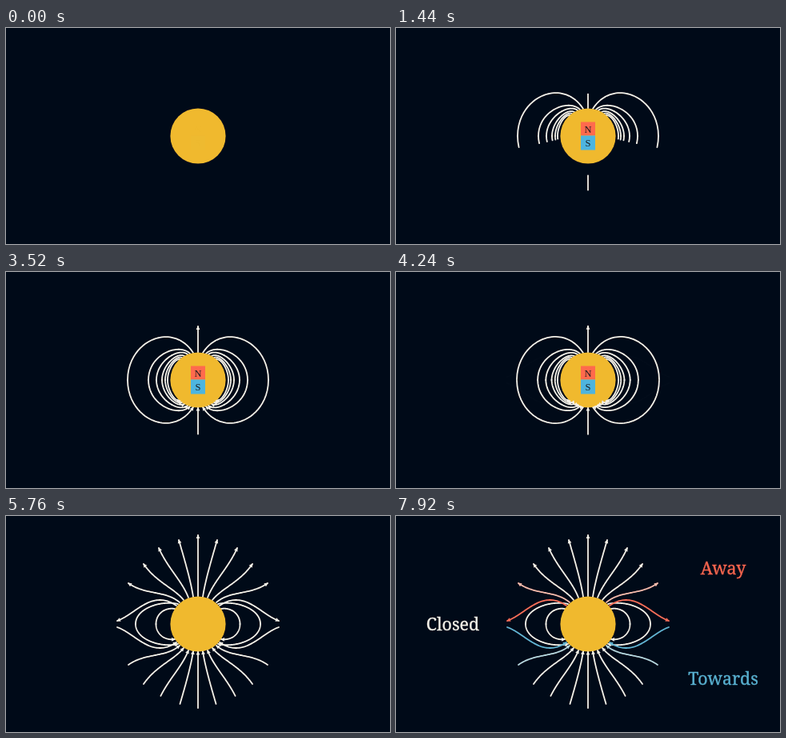
An HTML page with a canvas for the animation above (8000 ms loop, 480 by 270 pixels).

```html
<!DOCTYPE html>
<html lang="en">
<head>
<meta charset="utf-8">
<title>Magnetic field of a star</title>
<style>
html, body { margin: 0; width: 100%; height: 100%; overflow: hidden; background: #000a18; }
canvas { display: block; width: 480px; height: 270px; }
</style>
</head>
<body>
<canvas id="stage" width="480" height="270"></canvas>
<script>
const ctx = document.getElementById('stage').getContext('2d');
const LOOP = 8000, STEP = 80, CX = 240, CY = 135, R = 34.6, SAMPLES = 72, LAG = 3.5;
const WHITE = [245, 241, 232], RED = [250, 101, 78], BLUE = [88, 176, 208];

const clamp = x => Math.max(0, Math.min(1, x));
const mix = (a, b, t) => a + (b - a) * t;
const sigmoid = x => 1 / (1 + Math.exp(-x));
const EDGE = sigmoid(-5);
const smooth = x => clamp((sigmoid(10 * (clamp(x) - 0.5)) - EDGE) / (1 - 2 * EDGE));
const ramp = (t, start, length = 1000) => smooth((t - start) / length);
const rgb = c => `rgb(${c.map(Math.round).join(',')})`;
const blend = (a, b, t) => a.map((v, i) => mix(v, b[i], t));

function bezier(c, t) {
  const u = 1 - t, w = [u * u * u, 3 * u * u * t, 3 * u * t * t, t * t * t];
  return [0, 1].map(k => w.reduce((sum, v, i) => sum + v * c[2 * i + k], 0));
}

// Upper right quarter of each field line, from the surface outwards.
// a: dipole shape, b: stretched shape, order: place in the colour wave.
const OPEN = [
  { a: [6, -34, 32, -74, 88, -49, 88, 0], b: [6, -34, 9, -54, 17, -81, 24, -105], trim: 0.93, order: 4 },
  { a: [10, -33, 24, -47, 62, -32, 62, 0], b: [12, -33, 20, -54, 38, -70, 49, -95], trim: 0.93, order: 3 },
  { a: [13, -32, 24, -41, 52, -24, 52, 0], b: [18, -30, 30, -45, 52, -52, 68, -75], trim: 1, order: 2 },
  { a: [17, -30, 27, -35, 45, -18, 45, 0], b: [23, -27, 40, -42, 66, -36, 87, -51], trim: 1, order: 1 }
];
const CLOSED = [
  { a: [20, -28, 28, -31, 41, -15, 41, 0], b: [25, -25, 45, -30, 78, -20, 78, 0] },
  { a: [22, -26, 30, -27, 38, -12, 38, 0], b: [29, -19, 41, -21, 52.5, -13, 52.5, 0] }
];
const EQUATOR = [27, -23, 58, -44, 78, -12, 101, -4];

// Half-turn path between two points.
function swing(A, B, p) {
  const x = (A[0] - B[0]) / 2, y = (A[1] - B[1]) / 2;
  const c = Math.cos(Math.PI * p), s = Math.sin(Math.PI * p);
  return [(A[0] + B[0]) / 2 + x * c + y * s, (A[1] + B[1]) / 2 + y * c - x * s];
}

function quarter(at, sx, sy) {
  const pts = [];
  for (let i = 0; i <= SAMPLES; i++) {
    const q = at(i / SAMPLES);
    pts.push([CX + sx * q[0], CY + sy * q[1]]);
  }
  return pts;
}

function stroke(pts, from, to, color, alpha = 1) {
  if (to <= from || alpha <= 0) return;
  const n = pts.length - 1;
  const at = u => {
    const i = Math.min(n - 1, Math.floor(u * n)), f = u * n - i;
    return [mix(pts[i][0], pts[i + 1][0], f), mix(pts[i][1], pts[i + 1][1], f)];
  };
  ctx.globalAlpha = alpha;
  ctx.strokeStyle = rgb(color);
  ctx.beginPath();
  ctx.moveTo(...at(from));
  for (let i = 1; i < n; i++) if (i / n > from && i / n < to) ctx.lineTo(...pts[i]);
  ctx.lineTo(...at(to));
  ctx.stroke();
  ctx.globalAlpha = 1;
}

function drawTip({ pts, outer, color, alpha }) {
  if (alpha <= 0) return;
  const n = pts.length - 1;
  const [end, prev] = outer ? [pts[n], pts[n - 4]] : [pts[0], pts[4]];
  const turn = Math.atan2(end[1] - prev[1], end[0] - prev[0]);
  ctx.save();
  ctx.globalAlpha = alpha;
  ctx.translate(...end);
  ctx.rotate(turn);
  ctx.fillStyle = rgb(color);
  ctx.beginPath();
  ctx.moveTo(1, 0);
  ctx.lineTo(-4, -2.4);
  ctx.lineTo(-4, 2.4);
  ctx.fill();
  ctx.restore();
}

function drawField(t) {
  const grow = ramp(t, 920), p = ramp(t, 4175);
  const early = ramp(t, 1925, 500) * (1 - ramp(t, 4165, 500));
  const late = ramp(t, 5165, 500);
  const both = Math.max(early, late);
  const tips = [];
  ctx.lineWidth = 1.8;
  ctx.lineCap = ctx.lineJoin = 'round';

  const tint = (sy, order) =>
    blend(WHITE, sy < 0 ? BLUE : RED, ramp(t, 7165 + 300 * order));

  // The flow runs outwards above the equator and inwards below it.
  // pace: exponent by which the points crowd towards the surface.
  const line = (pts, top, reveal, color, tipAlpha, { alpha = 1, pace = 1 } = {}) => {
    if (top) stroke(pts, 0, reveal ** (1 / pace), color, alpha);
    else stroke(pts, (1 - reveal) ** (1 / pace), 1, color, alpha);
    tips.push({ pts, outer: top, color, alpha: tipAlpha });
  };

  for (const sy of [1, -1]) {
    const top = sy > 0;
    const half = top ? clamp(2 * grow) : clamp(2 * grow - 1);
    for (const sx of [1, -1]) {
      for (const { a, b, trim, order } of OPEN) {
        const cut = top ? 1 : trim;
        const at = u => swing(bezier(a, u ** LAG), bezier(b, u * cut), p);
        line(quarter(at, sx, sy), top, half, tint(sy, order), top ? late : both, { pace: LAG });
      }
      for (const { a, b } of CLOSED) {
        const c = a.map((v, i) => mix(v, b[i], p));
        line(quarter(u => bezier(c, u), sx, sy), top, half, WHITE, top ? 0 : both);
      }
      const pts = quarter(u => bezier(EQUATOR, u), sx, sy);
      line(pts, top, 1, tint(sy, 0), late, { alpha: p });
    }
    const reach = top ? mix(67, 111, p) : mix(67.5, 105, p);
    const axis = quarter(u => [0, -mix(R, reach, u)], 1, sy);
    line(axis, top, grow, tint(sy, 5), both);
  }
  return tips;
}

function drawMagnet(alpha) {
  if (alpha <= 0) return;
  ctx.globalAlpha = alpha;
  ctx.fillStyle = '#ff6a4d';
  ctx.fillRect(231, 117.5, 18, 17);
  ctx.fillStyle = '#4db5e0';
  ctx.fillRect(231, 134.5, 18, 18);
  ctx.fillStyle = '#1b1b20';
  ctx.font = '12.5px "Liberation Serif", serif';
  ctx.textAlign = 'center';
  ctx.fillText('N', CX, 130.7);
  ctx.fillText('S', CX, 148);
  ctx.globalAlpha = 1;
}

// Letters are outlined one after another, then filled.
function write(text, x, y, color, p) {
  if (p <= 0) return;
  ctx.font = '21.4px "Noto Serif", serif';
  ctx.textAlign = 'left';
  ctx.fillStyle = ctx.strokeStyle = rgb(color);
  const left = x - ctx.measureText(text).width / 2;
  const span = 1 + 0.2 * (text.length - 1);
  [...text].forEach((ch, i) => {
    const q = clamp(p * span - 0.2 * i);
    if (q <= 0) return;
    const gx = left + ctx.measureText(text.slice(0, i + 1)).width - ctx.measureText(ch).width;
    const fill = smooth(2 * q - 1);
    ctx.lineWidth = mix(1, 0.35, fill);
    ctx.setLineDash(q < 0.5 ? [70 * smooth(2 * q), 200] : []);
    ctx.strokeText(ch, gx, y);
    ctx.globalAlpha = fill;
    ctx.fillText(ch, gx, y);
    ctx.globalAlpha = 1;
  });
  ctx.setLineDash([]);
}

function draw(t) {
  ctx.fillStyle = '#000a18';
  ctx.fillRect(0, 0, 480, 270);
  const tips = drawField(t);
  ctx.fillStyle = '#f0b92e';
  ctx.beginPath();
  ctx.arc(CX, CY, R, 0, 2 * Math.PI);
  ctx.fill();
  drawMagnet(ramp(t, -75) * (1 - ramp(t, 4175)));
  tips.forEach(drawTip);
  const p = clamp((t - 6165) / 1000);
  write('Closed', 71, 143, WHITE, p);
  write('Away', 409, 73, RED, p);
  write('Towards', 409, 211, BLUE, p);
}

const begin = performance.now();
function tick() {
  const t = (performance.now() - begin) % LOOP;
  draw(Math.floor(t / STEP) * STEP);
  requestAnimationFrame(tick);
}
tick();
</script>
</body>
</html>
```
